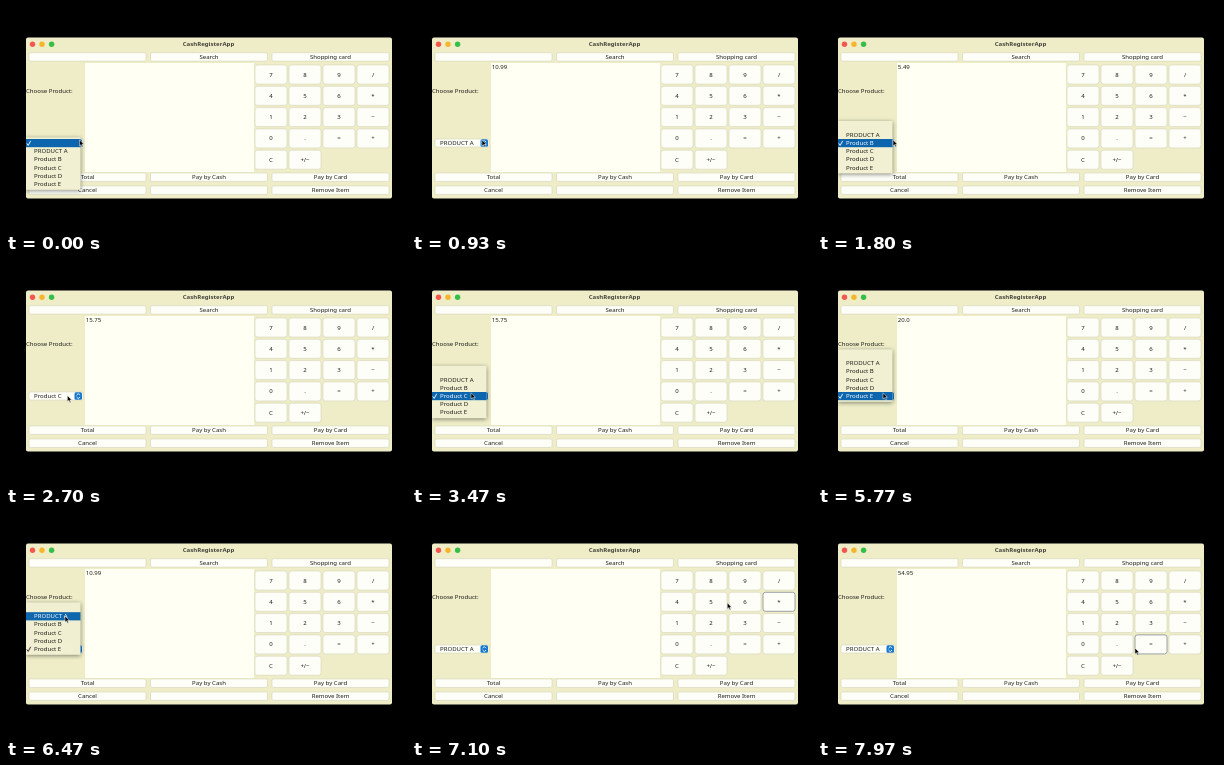
An HTML page that plays this animation: 400x225 px, repeating every 8 s.

```html
<!DOCTYPE html>
<html lang="en">
<head>
<meta charset="utf-8">
<title>Cash register</title>
<style>
  html, body { margin: 0; width: 100%; height: 100%; overflow: hidden; background: #000; }
  svg { display: block; width: 100vw; height: 100vh; }
  text { font: 500 6.05px "Noto Sans", "Open Sans", sans-serif; fill: #1c1c18; dominant-baseline: central; }
  .mid { text-anchor: middle; }
  .title { font-weight: 700; fill: #45453c; }
  .btn { fill: #fefef8; stroke: #d3d3ba; stroke-width: .6; }
  .focus { stroke: #858c96; stroke-width: .8; }
  #popup { filter: drop-shadow(0 1.5px 2px #0007); }
</style>
</head>
<body>
<svg viewBox="0 0 400 225">
  <rect x="20" y="31.5" width="366" height="161" rx="2" fill="#eeedc8"/>
  <circle cx="26.5" cy="38.2" r="2.7" fill="#f4574f"/>
  <circle cx="36" cy="38.2" r="2.7" fill="#f5b62e"/>
  <circle cx="45.6" cy="38.2" r="2.7" fill="#35bf48"/>
  <text class="mid title" x="202.5" y="38">CashRegisterApp</text>
  <rect x="79" y="57" width="169" height="109" fill="#fffff4"/>
  <g id="buttons"></g>
  <text x="20" y="84.6">Choose Product:</text>
  <text id="display" x="79.8" y="61.3"></text>
  <rect class="btn" x="23" y="133" width="54" height="8" rx="1.8"/>
  <text id="choice" x="28" y="137"></text>
  <rect x="68.5" y="133.3" width="7.5" height="7.5" rx="1.6" fill="#1878cc"/>
  <path d="M70.6 136.2l1.7-1.7 1.7 1.7M70.6 138l1.7 1.7 1.7-1.7" fill="none" stroke="#fff" stroke-width=".9"/>
  <g id="popup">
    <rect x="20" y="-1.6" width="54.5" height="52.4" fill="#f1f0d2"/>
    <rect id="bar" x="20" width="54.5" height="8.2" fill="#0d65ad"/>
    <g id="items"></g>
    <path id="check" d="M20.8 4.4l1.4 2 2.5-4.6" fill="none" stroke-width=".9"/>
  </g>
  <path id="cursor" d="M0 0V6.2L1.5 4.9 2.6 7.3 3.6 6.8 2.5 4.5H4.4Z" fill="#000" stroke="#fff" stroke-width=".5"/>
</svg>
<script>
const LOOP = 8000, ROW = 8.2, COMBO_Y = 133, FADE = 120;
const $ = id => document.getElementById(id);
const products = ["", "PRODUCT A", "Product B", "Product C", "Product D", "Product E"];

function add(parent, tag, attrs, label) {
  const el = document.createElementNS("http://www.w3.org/2000/svg", tag);
  for (const name in attrs) el.setAttribute(name, attrs[name]);
  if (label) el.textContent = label;
  return parent.appendChild(el);
}

function button(x, y, width, height, label, rx = 1.4) {
  const box = add($("buttons"), "rect", { x, y, width, height, rx, class: "btn" });
  const mid = { x: x + width / 2, y: y + height / 2 };
  add($("buttons"), "text", { ...mid, class: "mid" }, label);
  return { box, ...mid };
}

[[46.7, "", "Search", "Shopping card"],
 [167, "Total", "Pay by Cash", "Pay by Card"],
 [180, "Cancel", "", "Remove Item"]].forEach(([y, ...labels]) =>
  labels.forEach((label, i) => button(23 + i * 121.5, y, 117, 8.4, label)));

const keys = {};
["7", "8", "9", "/", "4", "5", "6", "*", "1", "2", "3", "−", "0", ".", "=", "+", "C", "+/−"]
  .forEach((label, i) => {
    keys[label] = button(249 + i % 4 * 34, 59 + Math.floor(i / 4) * 21.3, 32, 19, label, 2.4);
  });

const items = products.map((name, i) =>
  add($("items"), "text", { x: 28, y: (i + .5) * ROW - .1 }, name));

// Each click picks a product from the list opened at x, or presses a key.
const clicks = [
  { open: 0, at: 580, x: 73.5, row: 1, shows: "10.99" },
  { open: 1000, at: 1450, x: 70, row: 2, shows: "5.49" },
  { open: 1700, at: 2270, x: 75, row: 3, shows: "15.75" },
  { open: 3120, at: 4570, x: 59, row: 5, shows: "20.0" },
  { open: 5640, at: 6470, x: 65, row: 1, shows: "10.99" },
  { at: 6930, key: "*", shows: "" },
  { at: 7270, key: "5", shows: "5" },
  { at: 7770, key: "=", shows: (10.99 * 5).toFixed(2) },
];

// The pointer rests on the combo box, slides to its row, then waits for the click.
const stops = [];
const rest = (from, to, x, y) => stops.push({ from, to, x, y });
let chosen = 0;
for (const c of clicks) {
  if (c.key) {
    rest(c.at - 60, c.at + 50, keys[c.key].x + 1, keys[c.key].y + 1);
  } else {
    c.was = chosen;
    chosen = c.row;
    rest(c.open - 60, Math.max(c.open, c.at - 450), c.x, COMBO_Y + .8);
    rest(c.at - 120, c.at + 50, c.x - 6, COMBO_Y + (c.row - c.was) * ROW + 3.8);
  }
}
rest(LOOP, LOOP, 316.5, 136);

function pointer(t) {
  const i = stops.findLastIndex(s => s.from <= t);
  const a = stops[i], b = stops[i + 1];
  const u = Math.max(0, (t - a.to) / (b.from - a.to));
  const k = u * (2 - u);
  return { x: a.x + (b.x - a.x) * k, y: a.y + (b.y - a.y) * k };
}

function draw(t) {
  const tip = pointer(t);
  $("cursor").setAttribute("transform", `translate(${tip.x} ${tip.y})`);

  const done = clicks.filter(c => c.at <= t);
  const last = done.at(-1);
  $("display").textContent = last ? last.shows : "";
  $("choice").textContent = products[done.findLast(c => c.row)?.row ?? 0];
  for (const k in keys) keys[k].box.classList.toggle("focus", k === last?.key);

  const list = clicks.find(c => c.row && t >= c.open && t < c.at + FADE);
  $("popup").style.display = list ? "" : "none";
  if (!list) return;
  const top = COMBO_Y - list.was * ROW;
  const row = Math.floor((pointer(Math.min(t, list.at)).y - top) / ROW);
  $("popup").setAttribute("transform", `translate(0 ${top})`);
  $("popup").style.opacity = Math.min(1, 1 - (t - list.at) / FADE);
  $("bar").setAttribute("y", row * ROW);
  items.forEach((item, i) => item.style.fill = i === row ? "#fff" : "");
  $("check").setAttribute("transform", `translate(0 ${list.was * ROW})`);
  $("check").setAttribute("stroke", list.was === row ? "#fff" : "#1c1c18");
}

function tick() {
  draw(performance.now() % LOOP);
  requestAnimationFrame(tick);
}
tick();
</script>
</body>
</html>
```
